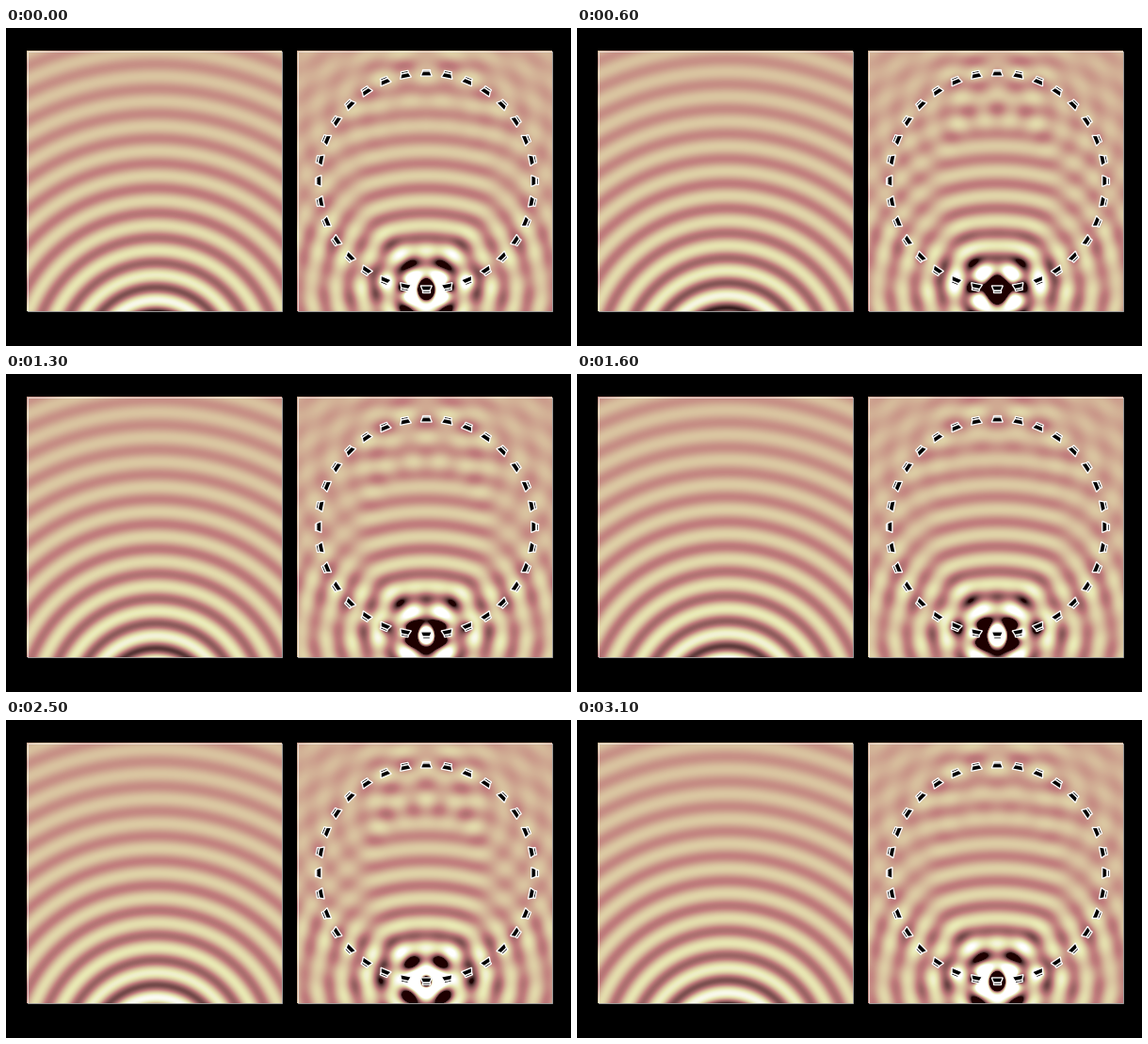
Write a matplotlib script that moves like this. It is 600 by 338 pixels and loops after 3200 ms.

```python
import numpy as np
import matplotlib.pyplot as plt
from matplotlib.animation import FuncAnimation
from matplotlib.patches import Polygon, Rectangle

# Sound field of a point source (left) and its higher order
# ambisonics synthesis with a circular loudspeaker array (right).
W, H, DPI = 600, 338, 100
FRAMES, INTERVAL = 32, 100

PANEL_W, PANEL_H = 271, 277
TOP = 24
LEFTS = (22, 309)
AXIS = 137.3            # symmetry axis, px from a panel's left edge
SCALE = 76.9            # px per metre

K = 2 * np.pi * 1000 / 343
RADIUS = 1.5
SOURCE = 2.5
COUNT = 32
ORDER = 15
LIMIT = 3.5


def hankel(order, z):
    """Spherical Hankel functions of the second kind, degrees 0..order."""
    wave = np.exp(-1j * z)
    h = [1j * wave / z, -wave * (z - 1j) / z**2]
    for n in range(1, order):
        h.append((2 * n + 1) / z * h[n] - h[n - 1])
    return np.array(h)


def monopole(x, y, x0, y0):
    r = np.maximum(np.hypot(x - x0, y - y0), 1e-3)
    return -np.exp(-1j * K * r) / r


def synthesis(x, y):
    modes = hankel(ORDER, K * SOURCE) / hankel(ORDER, K * RADIUS)
    m = np.arange(1, ORDER + 1)
    field = np.zeros_like(x, dtype=complex)
    for a in 2 * np.pi * np.arange(COUNT) / COUNT:
        weight = modes[0] + 2 * np.sum(modes[1:] * np.cos(m * a))
        field += weight * monopole(x, y, RADIUS * np.sin(a), -RADIUS * np.cos(a))
    return SOURCE * field / COUNT


cols = (np.arange(PANEL_W) + 0.5 - AXIS) / SCALE
rows = (PANEL_H / 2 - np.arange(PANEL_H) - 0.5) / SCALE
X, Y = np.meshgrid(cols, rows)
fields = [SOURCE * monopole(X, Y, 0, -SOURCE), synthesis(X, Y)]

fig = plt.figure(figsize=(W / DPI, H / DPI), dpi=DPI, facecolor="black")
ax = fig.add_axes([0, 0, 1, 1])
ax.axis("off")


def add_panel(left, field):
    box = (left, left + PANEL_W, TOP + PANEL_H, TOP)
    image = ax.imshow(field.real, cmap="pink", vmin=-LIMIT, vmax=LIMIT,
                      extent=box, interpolation="nearest", aspect="auto")
    ax.add_patch(Rectangle((left + 0.5, TOP + 0.5), PANEL_W - 1, PANEL_H - 1,
                           fill=False, ec="white", lw=0.72, alpha=0.6))
    return image


def add_speaker(angle):
    """Loudspeaker symbol on the array, horn facing the centre."""
    out = np.array([np.sin(angle), np.cos(angle)])
    side = np.array([out[1], -out[0]])
    centre = np.array([LEFTS[1] + AXIS, TOP + PANEL_H / 2]) + RADIUS * SCALE * out
    box = [(-3.9, 1.2), (3.9, 1.2), (3.9, 3.4), (-3.9, 3.4)]
    horn = [(-6, -3.9), (6, -3.9), (3.9, 1.2), (-3.9, 1.2)]
    for shape in (box, horn):
        points = [centre + u * side + v * out for u, v in shape]
        ax.add_patch(Polygon(points, fc="black", ec="white", lw=0.95,
                             joinstyle="miter", zorder=3))


images = [add_panel(left, field) for left, field in zip(LEFTS, fields)]
for i in range(COUNT):
    add_speaker(2 * np.pi * i / COUNT)
ax.set_xlim(0, W)
ax.set_ylim(H, 0)


def update(frame):
    turn = np.exp(2j * np.pi * frame / FRAMES)
    for image, field in zip(images, fields):
        image.set_data((field * turn).real)
    return images


anim = FuncAnimation(fig, update, frames=FRAMES, interval=INTERVAL,
                     repeat=True, repeat_delay=0, blit=False)
plt.show()
```
